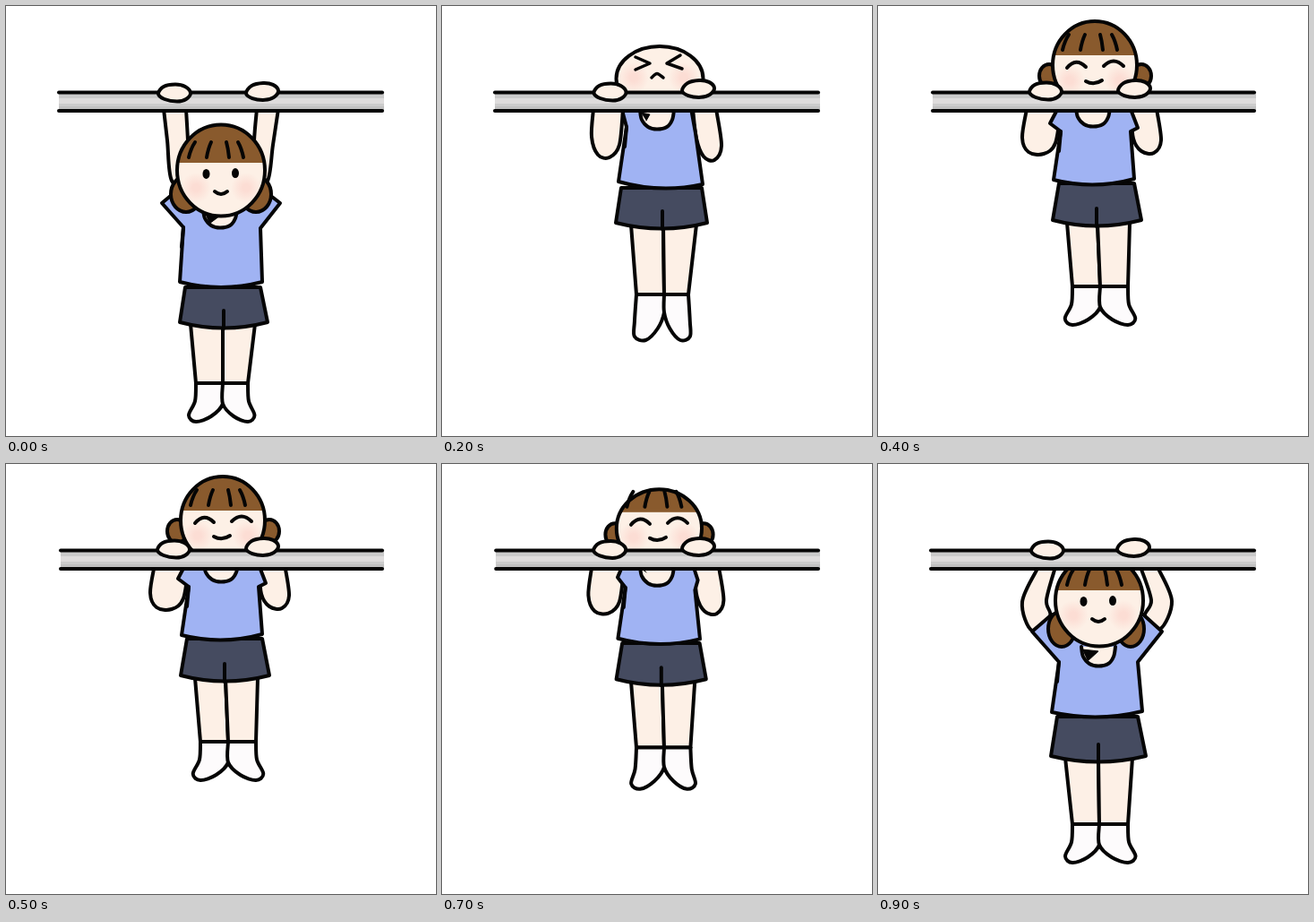
Write an HTML page with a canvas that moves like this. It is 480 px wide and 480 px high and loops after 1 s.

```html
<!DOCTYPE html>
<html lang="en">
<head>
<meta charset="utf-8">
<title>Pull-up</title>
<style>
html, body { margin: 0; height: 100%; overflow: hidden; background: #fff; }
canvas { display: block; width: 100vw; height: 100vh; }
</style>
</head>
<body>
<canvas id="stage" width="480" height="480"></canvas>
<script>
const ctx = document.getElementById('stage').getContext('2d');
const INK = '#050505', SKIN = '#fdf0e6', SHIRT = '#a0b3f3', SHORTS = '#454b60',
  HAIR = '#895a2d', SOCK = '#fdfbfc';
const TURNED = [[-30, 0], [-31, 20], [-38, 36], [-30, 43], [-13, 37], [0, 23], [0, 0]];
const POINTED = [[-30, 0], [-32, 30], [-32, 47], [-20, 51], [-7, 38], [0, 20], [0, 0]];

// head: x, y, rx, ry; legs: hips and ankles left, centre, right, then y
const hang = {
  head: [240, 183.5, 49, 51], face: [240, 187], mood: 'calm', hair: true, up: false,
  tails: [[201, 210], [279, 210], [17, 20]],
  armL: [[176, 115], [180, 150], [185, 195], [205, 200], [203, 150], [201, 115]],
  armR: [[304, 115], [298, 155], [292, 195], [276, 195], [277, 150], [280, 115]],
  sideL: [[192, 205], [174, 220], [198, 247], [194, 308]],
  sideR: [[288, 206], [306, 220], [284, 248], [286, 308]],
  neck: [239, 249], shade: [22, 14],
  shorts: [200, 284, 314, 194, 292, 353, 243],
  legs: [206, 242, 278, 355, 212, 242, 270, 421], feet: TURNED,
  hands: [188, 97, 286, 95.5], bar: 58, lift: 0
};
const pull = {
  ...hang,
  head: [247, 152.5, 49, 51], face: [246, 153],
  tails: [[205, 184], [282, 184], [15, 20]],
  armL: [[179, 115], [161, 154], [172, 186], [192, 170], [188, 152], [198, 115]],
  armR: [[312, 115], [328, 153], [315, 184], [298, 170], [305, 152], [293, 115]],
  sideL: [[194, 168], [172, 187], [202, 221], [194, 277]],
  sideR: [[296, 168], [317, 187], [290, 221], [295, 276]],
  neck: [246, 227], shade: [18, 13],
  shorts: [200, 290, 282, 193, 299, 326, 246],
  legs: [209, 246, 284, 328, 217, 247, 279, 402],
  hands: [189, 96, 285, 93.5]
};
const strain = {
  ...hang,
  head: [243, 81, 48.5, 36], face: [242, 64], mood: 'strain', hair: false, up: true,
  tails: [[196, 80], [289, 80], [10, 12]],
  armL: [[169, 115], [167, 146], [174, 166], [187, 169], [198, 155], [202, 115]],
  armR: [[306, 115], [312, 156], [304, 172], [292, 168], [284, 148], [280, 115]],
  sideL: [[203, 110], [202, 120], [206, 135], [197, 196]],
  sideR: [[278, 110], [279, 120], [283, 142], [291, 199]],
  neck: [240, 139], shade: [10, 9],
  shorts: [200, 290, 203, 194, 296, 242, 246],
  legs: [211, 247, 284, 244, 217, 248, 275, 322], feet: POINTED,
  hands: [187.5, 96, 286, 92.5]
};
const top_ = {
  ...strain,
  head: [242, 66, 47, 49], face: [242, 67], mood: 'happy', hair: true,
  tails: [[191, 78], [294, 78], [11, 13]],
  armL: [[166, 115], [161, 147], [168, 163], [185, 165], [198, 153], [204, 115]],
  armR: [[311, 115], [316, 150], [308, 164], [294, 162], [285, 148], [282, 115]],
  sideL: [[203, 110], [192, 131], [204, 140], [196, 194]],
  sideR: [[280, 110], [290, 136], [282, 140], [286, 193]],
  neck: [240, 136], shade: [0, 0],
  shorts: [202, 286, 198, 195, 294, 239, 244],
  legs: [211, 245, 281, 242, 217, 248, 279, 313], feet: TURNED,
  hands: [187, 95, 286, 92.5], bar: 60
};

// Blends numbers at any depth; other values come from b.
function mix(a, b, k) {
  if (typeof b === 'number') return a + (b - a) * k;
  if (Array.isArray(b)) return b.map((v, i) => mix(a[i], v, k));
  if (b && typeof b === 'object')
    return Object.fromEntries(Object.keys(b).map(key => [key, mix(a[key], b[key], k)]));
  return b;
}

const rise = mix(strain, top_, 0.6);
const peak = { ...top_, lift: -3 };
const cycle = [hang, pull, strain, rise, top_, peak, top_, rise, strain, pull];

function paint(fill, width = 4) {
  if (fill) { ctx.fillStyle = fill; ctx.fill(); }
  if (width) { ctx.lineWidth = width; ctx.stroke(); }
}

// Catmull-Rom curve through the points
function curve(pts, closed) {
  const n = pts.length;
  const at = i => closed ? pts[(i + n) % n] : pts[Math.max(0, Math.min(n - 1, i))];
  ctx.beginPath();
  ctx.moveTo(...pts[0]);
  for (let i = 0; i < (closed ? n : n - 1); i++) {
    const [a, b, c, d] = [at(i - 1), at(i), at(i + 1), at(i + 2)];
    ctx.bezierCurveTo(b[0] + (c[0] - a[0]) / 6, b[1] + (c[1] - a[1]) / 6,
      c[0] - (d[0] - b[0]) / 6, c[1] - (d[1] - b[1]) / 6, c[0], c[1]);
  }
}

function lines(...pts) {
  ctx.beginPath();
  pts.forEach(p => ctx.lineTo(...p));
}

function oval(x, y, rx, ry) {
  ctx.beginPath();
  ctx.ellipse(x, y, rx, ry, 0, 0, Math.PI * 2);
}

function arc(x1, y1, cx, cy, x2, y2) {
  ctx.beginPath();
  ctx.moveTo(x1, y1);
  ctx.quadraticCurveTo(cx, cy, x2, y2);
  paint(null);
}

function drawLegs({ legs, feet }) {
  const [hl, hc, hr, hy, al, ac, ar, ay] = legs;
  for (const [hip, ankle] of [[hl, al], [hr, ar]]) {
    lines([hip, hy], [ankle, ay], [ac, ay], [hc, hy]);
    paint(SKIN);
    const s = (ac - ankle) / 30;
    curve(feet.map(([x, y]) => [ac + x * s, ay + y]));
    paint(SOCK);
    lines([ankle, ay], [ac, ay]);
    paint(null);
  }
}

function drawShorts([tl, tr, ty, bl, br, by, cx]) {
  lines([bl, by], [tl, ty], [tr, ty], [br, by]);
  ctx.quadraticCurveTo(cx, by + 13, bl, by);
  paint(SHORTS);
  lines([cx, by - 13], [cx, by + 7]);
  paint(null);
}

function drawShirt({ sideL, sideR, neck: [nx, ny], shade: [sw, sh] }) {
  const hemL = sideL[3], hemR = sideR[3];
  lines(...sideR);
  ctx.quadraticCurveTo((hemL[0] + hemR[0]) / 2, (hemL[1] + hemR[1]) / 2 + 12, ...hemL);
  [...sideL].reverse().forEach(p => ctx.lineTo(...p));
  paint(SHIRT);
  const [px, py] = sideL[2];
  lines([px, py], [px - 2, py + 22]);
  paint(null);
  curve([[nx - 19, ny - 23], [nx - 17, ny - 12], [nx - 10, ny - 4], [nx, ny - 1.5],
    [nx + 11, ny - 4], [nx + 17, ny - 12], [nx + 19, ny - 23]]);
  paint(SKIN);
  if (sw) {
    lines([nx - 18, ny - 20], [nx - 18 + sw, ny - 18], [nx - 12, ny - 20 + sh]);
    paint(INK, 1);
  }
}

function drawFace([x, y], mood) {
  if (mood === 'calm') {
    for (const dx of [-16.5, 16]) { oval(x + dx, y - dx / 40, 4, 5.5); paint(INK, 0); }
    arc(x - 7, y + 20, x, y + 26, x + 7, y + 20);
  } else if (mood === 'strain') {
    lines([x - 26, y - 7], [x - 10, y], [x - 26, y + 7]); paint(null, 3.5);
    lines([x + 24, y - 9], [x + 9, y], [x + 26, y + 6]); paint(null, 3.5);
    curve([[x - 8, y + 16], [x - 2, y + 11.5], [x + 5, y + 16]]); paint(null, 3.5);
  } else {
    arc(x - 31, y + 2, x - 21, y - 10, x - 10, y + 1);
    arc(x + 10, y, x + 21, y - 11, x + 32, y);
    arc(x - 10, y + 17, x - 1, y + 22, x + 8, y + 16);
  }
}

function drawHead({ head, face, mood, hair, tails }) {
  const [x, y, rx, ry] = head, [fx, fy] = face, fringe = fy - 12;
  if (hair) {
    const [l, r, size] = tails;
    for (const p of [l, r]) { oval(...p, ...size); paint(HAIR); }
  }
  oval(x, y, rx, ry);
  paint(SKIN, 0);
  ctx.save();
  ctx.clip();
  for (const dx of [-28, 28]) {
    const cx = fx + dx, cy = fy + 16;
    const blush = ctx.createRadialGradient(cx, cy, 4, cx, cy, 17);
    blush.addColorStop(0, '#fcddd4');
    blush.addColorStop(1, '#fcddd400');
    oval(cx, cy, 17, 17);
    paint(blush, 0);
  }
  if (hair) {
    ctx.fillStyle = HAIR;
    ctx.fillRect(x - rx, y - ry, rx * 2, fringe - y + ry);
  }
  ctx.restore();
  oval(x, y, rx, ry);
  paint(null);
  if (hair) {
    for (const [a, b] of [[-29, -36], [-11, -16], [6, 9], [19, 25]]) {
      arc(x + a, fringe - 23, x + (a + b * 2) / 3, fringe - 16, x + b, fringe - 6);
    }
  }
  drawFace(face, mood);
}

function drawBar(x) {
  const w = 421 - x;
  [[97, 21, '#c1c1c1'], [99, 4, '#cacaca'], [103, 6, '#dedcdc'], [109, 3, '#cccccc']]
    .forEach(([y, h, c]) => { ctx.fillStyle = c; ctx.fillRect(x + 1, y, w, h); });
  for (const y of [96.5, 117]) { lines([x + 1, y], [420, y]); paint(null); }
}

function drawHand(x, y, tilt) {
  const shape = [[-18, 1], [-12, -7], [1, -9.5], [12, -7], [18, 0], [13, 7], [3, 9.5], [-11, 7]];
  curve(shape.map(([dx, dy]) => [x + dx, y + dy - dx * tilt]), true);
  paint(SKIN);
}

function drawPose(p) {
  ctx.fillStyle = '#fff';
  ctx.fillRect(0, 0, 480, 480);
  ctx.strokeStyle = INK;
  ctx.lineCap = ctx.lineJoin = 'round';
  ctx.save();
  ctx.translate(0, p.lift);
  if (p.up) drawHead(p);
  for (const arm of [p.armL, p.armR]) { curve(arm); paint(SKIN); }
  drawLegs(p);
  drawShorts(p.shorts);
  drawShirt(p);
  if (!p.up) drawHead(p);
  ctx.restore();
  drawBar(p.bar);
  const [lx, ly, rx, ry] = p.hands;
  drawHand(lx, ly, 0);
  drawHand(rx, ry, 0.05);
}

function tick() {
  drawPose(cycle[Math.floor(performance.now() / 100) % cycle.length]);
  requestAnimationFrame(tick);
}
tick();
</script>
</body>
</html>
```
